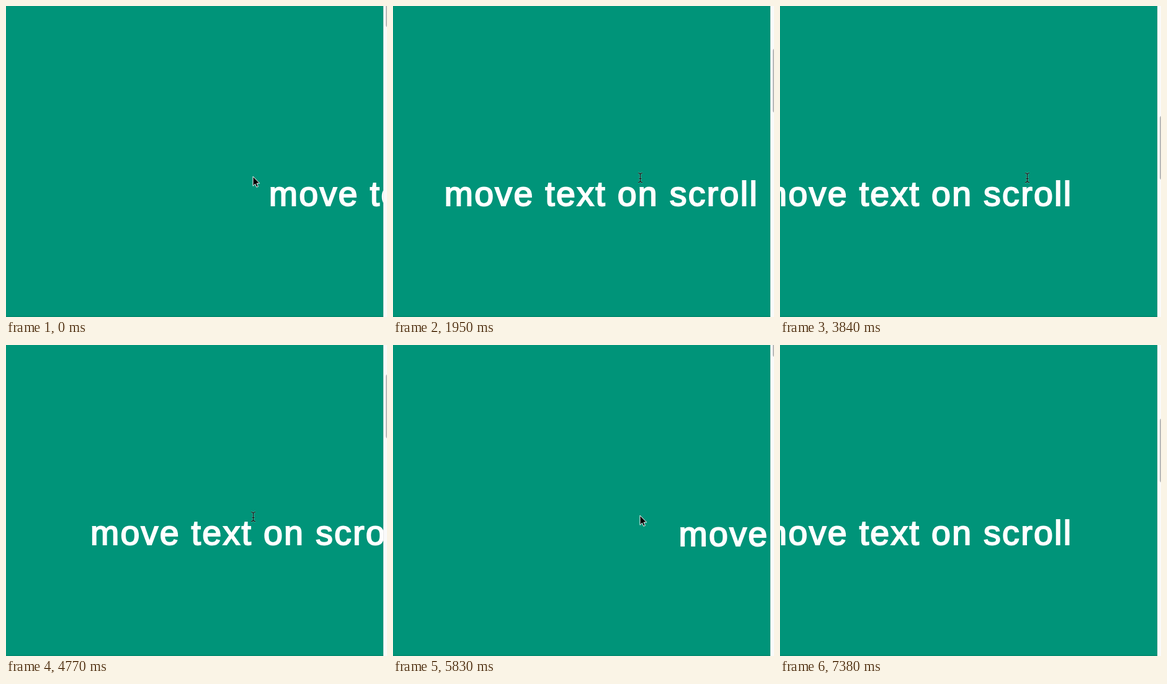
An HTML page that plays this animation: 614x500 px, repeating every 7790 ms.

```html
<!DOCTYPE html>
<html lang="en">
<head>
<meta charset="utf-8">
<title>move text on scroll</title>
<style>
  html, body { margin: 0; width: 100%; height: 100%; overflow: hidden; background: #009479; }
  svg { display: block; width: 614px; height: 500px; }
  text {
    font: 55.5px "Liberation Sans", Arial, Helvetica, sans-serif;
    letter-spacing: 2.3px;
    fill: #fff;
    stroke: #fff;
    stroke-width: 2px;
  }
</style>
</head>
<body>
<svg viewBox="0 0 614 500">
  <defs>
    <path id="bar" d="M395 268.5q3 0 3.5 2q.5-2 3.5-2M398.5 270.5v11M395 283.5q3 0 3.5-2q.5 2 3.5 2M396.5 277.5h4"/>
  </defs>
  <rect width="614" height="500" fill="#009479"/>
  <text id="title">move text on scroll</text>
  <rect y="498" width="608" height="2" fill="#028b71"/>
  <rect x="608" width="6" height="500" fill="#fafafa"/>
  <rect x="608" width="1" height="500" fill="#e8e8e8"/>
  <rect id="thumb" x="612" width="7" height="103" rx="3.5"/>
  <path id="arrow" d="M398 274v15.4l3.5-3.3 2.3 5.2 2.6-1.1-2.3-5.1h4.6z"
        stroke="#fff" stroke-linejoin="round"/>
  <g id="beam" fill="none">
    <use href="#bar" stroke="#fff" stroke-opacity=".35" stroke-width="2.4"/>
    <use href="#bar" stroke="#111" stroke-width="1.1"/>
  </g>
</svg>
<script>
  const LOOP = 7790;
  const START = 840, TICK = 58.2;   // the page redraws in even ticks
  const TOP = -83.8;                // thumb position with the page at its top
  const TEXT_END = 116;             // the text stops once the thumb is this far down
  const RATIO = 2.48;               // text travel per pixel of thumb travel
  const HIT_TOP = 5480;             // the page runs into its top edge

  const easeIn = p => u => u ** p;
  const easeOut = p => u => 1 - (1 - u) ** p;

  // flicks of the wheel; the thumb rests between them
  const flicks = [
    { start: 782, end: 1948, to: 69, ease: easeIn(1.68) },
    { start: 1948, end: 2870, to: 125, ease: easeOut(1.6) },
    { start: 2990, end: 3300, to: 217, ease: easeOut(1.5) },
    { start: 3300, end: HIT_TOP, to: TOP, ease: easeIn(1.376) },
    { start: 5800, end: 6610, to: 118, ease: easeOut(2.2) }
  ];

  const clamp = u => Math.min(1, Math.max(0, u));

  function thumbTop(t) {
    let top = -69;
    for (const { start, end, to, ease } of flicks) {
      top += (to - top) * ease(clamp((t - start) / (end - start)));
    }
    return top;
  }

  // rubber band: quick pull, then decay
  function bounce(t) {
    const u = Math.max(0, t - HIT_TOP) / 58;
    return 26 * u * Math.exp(1 - u);
  }

  const [title, thumb, arrow, beam] =
    ["title", "thumb", "arrow", "beam"].map(id => document.getElementById(id));
  const show = (el, on) => el.setAttribute("visibility", on ? "visible" : "hidden");

  function draw(t) {
    const at = t < START ? 0 : START + TICK * Math.floor((t - START) / TICK);
    const top = thumbTop(at);
    const x = -32.5 + RATIO * Math.max(0, TEXT_END - top);
    title.setAttribute("x", x - 2.5);
    title.setAttribute("y", 321.2 + bounce(at));

    const hover = t >= 7140 && t < 7380;
    thumb.setAttribute("y", top);
    thumb.setAttribute("fill", hover ? "#8a8a8a" : "#b9b9b9");

    const inside = t < 6610, over = x < 365;
    show(arrow, inside && !over);
    show(beam, inside && over);
  }

  const begin = performance.now();
  function frame() {
    draw((performance.now() - begin) % LOOP);
    requestAnimationFrame(frame);
  }
  draw(0);
  requestAnimationFrame(frame);
</script>
</body>
</html>
```
